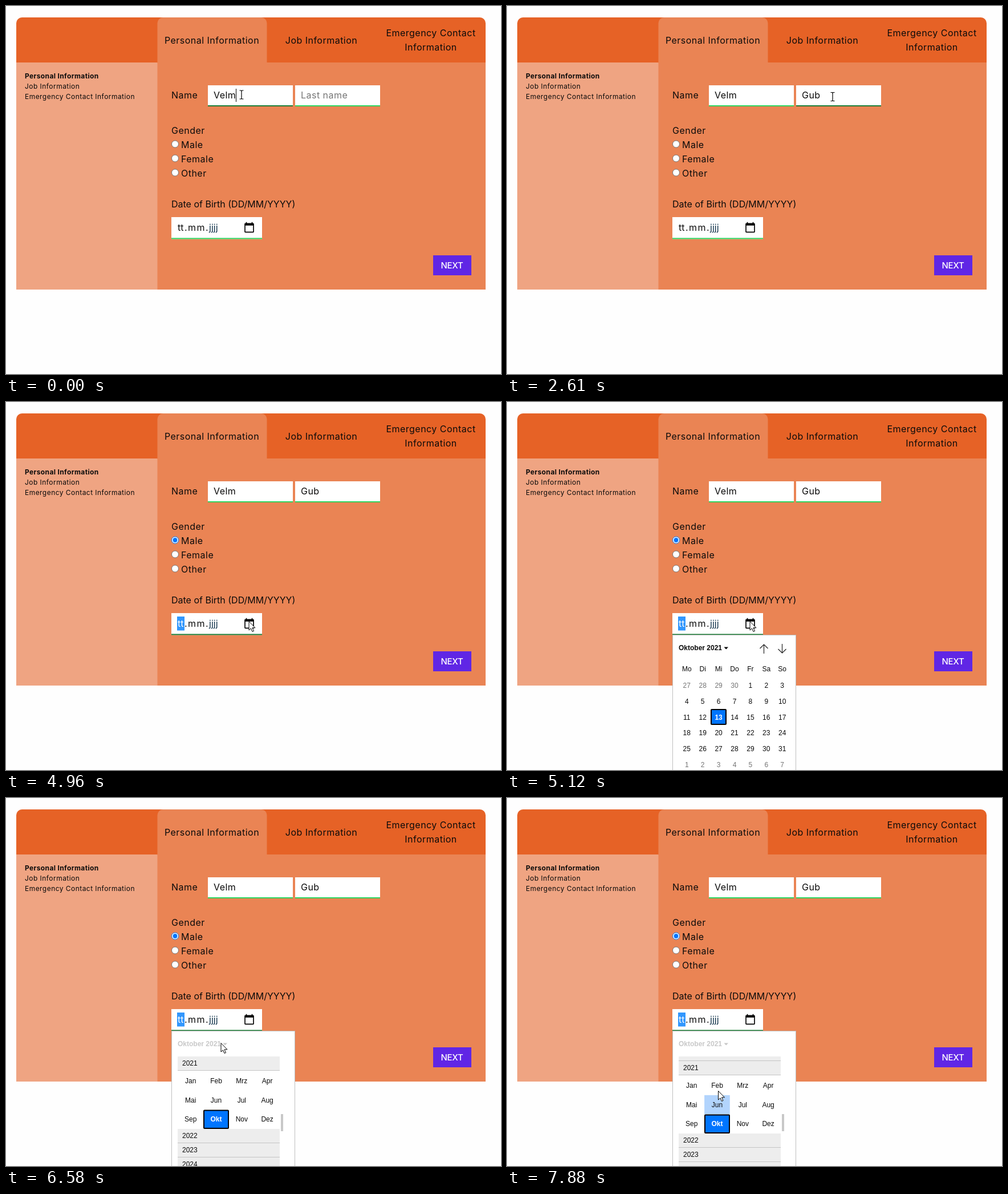
Write an HTML page that moves like this. It is 868 by 645 pixels and loops after 8 s.

```html
<!DOCTYPE html>
<html lang="en">
<head>
<meta charset="utf-8">
<title>Registration form</title>
<style>
html, body { margin: 0; width: 100%; height: 100%; overflow: hidden; background: #fefefe; }
svg { display: block; width: 100vw; height: 100vh; }
text { font: 400 16px Inter, sans-serif; letter-spacing: .03em; fill: #0b0b0b; white-space: pre; }
.mid { text-anchor: middle; }
.side { font-size: 12px; letter-spacing: .038em; }
.here { font-weight: 700; letter-spacing: .03em; }
.wide { letter-spacing: 0; }
.loose { letter-spacing: .09em; }
.next { font-size: 15px; font-weight: 500; letter-spacing: -.015em; fill: #fff; }
.cal text { font: 12px "Liberation Sans", Arial, sans-serif; letter-spacing: 0; }
.cal .bold { font-weight: 700; }
.cal .dim { fill: #757575; }
.cal .on { font-weight: 700; fill: #fff; }
</style>
</head>
<body>
<script>
const NS = 'http://www.w3.org/2000/svg';
const LOOP = 8000;
const FIRST = 'Velm', LAST = 'Gub';
const GREEN = '#2fd45f', FOCUS = '#1c7c36', BLUE = '#0075ff';

function add(parent, tag, attrs = {}, content = '') {
  const el = document.createElementNS(NS, tag);
  set(el, attrs);
  el.textContent = content;
  return parent.appendChild(el);
}
function set(el, attrs) {
  for (const k in attrs) el.setAttribute(k, attrs[k]);
}
const rect = (p, x, y, width, height, fill, more) =>
  add(p, 'rect', { x, y, width, height, fill, ...more });
const text = (p, x, y, str, cls = '') => add(p, 'text', { x, y, class: cls }, str);
const path = (p, d, more) => add(p, 'path', { d, fill: 'none', stroke: '#000', ...more });
const show = (el, on) => set(el, { visibility: on ? 'inherit' : 'hidden' });

const svg = add(document.body, 'svg', { viewBox: '0 0 868 645' });
rect(svg, 0, 0, 868, 645, '#fefefe');

// Card, tabs and side menu
path(svg, 'M18 99V30a10 10 0 0 1 10-10H831a10 10 0 0 1 10 10V99Z', { fill: '#e66226', stroke: 'none' });
rect(svg, 18, 99, 248, 398, '#efa482');
rect(svg, 265.5, 99, 575.5, 398, '#ea8454');
path(svg, 'M265.5 100V30a10 10 0 0 1 10-10H447.500a10 10 0 0 1 10 10V100Z', { fill: '#ea8454', stroke: 'none' });
text(svg, 361, 66, 'Personal Information', 'mid');
text(svg, 553, 66, 'Job Information', 'mid');
text(svg, 745, 53, 'Emergency Contact', 'mid');
text(svg, 745, 78, 'Information', 'mid');
['Personal Information', 'Job Information', 'Emergency Contact Information'].forEach((s, i) =>
  text(svg, 33, 127 + 18 * i, s, i ? 'side' : 'side here'));

// Form
function field(x, y, w, h) {
  rect(svg, x, y, w, h, '#fff');
  return rect(svg, x, y + h - 2, w, 2, GREEN);
}
text(svg, 290, 162, 'Name');
const firstLine = field(354, 139, 149, 37);
const lastLine = field(507, 139, 149, 37);
const firstText = text(svg, 364, 162, FIRST);
const lastText = text(svg, 517, 162, '');
const squiggle = path(svg, 'M517 164' + 'l2 -1.800l2 1.800'.repeat(8), { stroke: '#e02020' });
const caret = rect(svg, 0, 145, 1, 23, '#000');

text(svg, 290, 223.5, 'Gender');
const radios = ['Male', 'Female', 'Other'].map((s, i) => {
  const cy = 242 + 25 * i;
  text(svg, 307, cy + 6.5, s);
  return add(svg, 'circle', { cx: 296.5, cy, r: 6, fill: '#fff', stroke: '#767676' });
});
const dot = add(svg, 'circle', { cx: 296.5, cy: 242, r: 3.9, fill: BLUE });

text(svg, 290, 353, 'Date of Birth (DD/MM/YYYY)', 'wide');
const dateLine = field(290, 370, 159, 38.5);
const mark = rect(svg, 300, 376, 13, 24.5, '#3297fd');
const day = text(svg, 301, 394, 'tt', 'wide');
text(svg, 313, 394, '.mm.', 'loose');
set(text(svg, 356, 394, 'jjjj', 'wide'), { style: 'fill:#0e3048' });
path(svg, 'M20 3h-1V1h-2v2H7V1H5v2H4c-1.1 0-2 .9-2 2v16c0 1.1 .9 2 2 2h16c1.1 0 2-.9 2-2V5c0-1.1-.9-2-2-2zm0 18H4V8h16z',
  { fill: '#000', stroke: 'none', transform: 'translate(416.5 378) scale(.833)' });

rect(svg, 749, 437, 67, 35, '#6026e5');
text(svg, 782, 460, 'NEXT', 'next mid');

// Date picker
const cal = add(svg, 'g', { class: 'cal' });
rect(cal, 290.5, 408.5, 216, 250, '#fff', { stroke: '#bfbfbf' });
const head = add(cal, 'g');
text(head, 301, 435, 'Oktober 2021', 'bold');
path(head, 'M380.500 429.500H388L384.200 433.500Z', { fill: '#000', stroke: 'none' });

const picked = (p, x, y, w, h) =>
  rect(p, x, y, w, h, BLUE, { stroke: '#000', 'stroke-width': 2, rx: 1 });

const days = add(cal, 'g');
path(days, 'M450.500 441V425M443.500 432L450.500 425L457.500 432M482.500 424V440M475.500 433L482.500 440L489.500 433',
  { stroke: '#222', 'stroke-width': 1.2 });
picked(days, 358, 539, 26, 26);
['Mo', 'Di', 'Mi', 'Do', 'Fr', 'Sa', 'So'].forEach((s, col) => {
  const x = 315.3 + 27.9 * col;
  text(days, x, 472, s, 'mid');
  for (let row = 0; row < 6; row++) {
    const n = row * 7 + col - 3;
    const out = n < 1 || n > 31;
    const num = n < 1 ? n + 30 : n > 31 ? n - 31 : n;
    text(days, x, 501 + 27.8 * row, num, 'mid ' + (out ? 'dim' : n === 13 ? 'on' : ''));
  }
});

const months = add(cal, 'g');
const clip = add(add(svg, 'defs'), 'clipPath', { id: 'list' });
rect(clip, 301, 453, 179, 192, '#000');
const list = add(add(months, 'g', { 'clip-path': 'url(#list)' }), 'g');
[[2020, 428], [2021, 453], [2022, 580], [2023, 605], [2024, 630]].forEach(([year, y]) => {
  rect(list, 301, y, 179, 25, '#ededed');
  rect(list, 301, y + 24, 179, 1, '#c4c4c4');
  text(list, 309, y + 16, year);
});
const hover = rect(list, 0, 0, 44.7, 33.6, '#b2d4fd');
picked(list, 347, 547.5, 43, 31.5);
'Jan Feb Mrz Apr Mai Jun Jul Aug Sep Okt Nov Dez'.split(' ').forEach((s, i) =>
  text(list, 323.7 + 44.8 * (i % 4), 500 + 33.6 * (i >> 2), s, s === 'Okt' ? 'mid on' : 'mid'));
rect(months, 482, 554, 4, 30, '#c8c8c8');

// Mouse pointers, both drawn around their hot spot
const beam = path(svg, 'M-3.500 -7.500H-1L0 -6.500L1 -7.500H3.500M0 -6.500V6.500M-3.500 7.500H-1L0 6.500L1 7.500H3.500',
  { 'stroke-width': 1.2 });
const arrow = path(svg, 'M0 .5V16L3.500 12.800L6 18.500L8.500 17.400L6 11.800H11Z', { fill: '#fff' });

// Each move: start, end, number of jumps, target x and y, sag
const moves = [
  [280, 860, 5, 571, 159, 8],
  [2760, 3620, 7, 300, 247, 0],
  [3770, 3770, 1, 296, 244, 0],
  [4230, 4810, 5, 426, 384, 0],
  [5550, 6000, 4, 407, 431, 0],
  [6130, 6430, 3, 377, 429, 0],
  [6860, 7010, 2, 415, 505, 0],
  [7300, 7730, 4, 370.5, 513, 0]
];
function mouse(t) {
  let x = 413, y = 155.5;
  for (const [from, to, n, tx, ty, sag] of moves) {
    if (t < from) break;
    const gap = n > 1 ? (to - from) / (n - 1) : 1;
    const k = Math.min(n, Math.floor((t - from) / gap + .001) + 1) / n;
    x += (tx - x) * k;
    y += (ty - y) * k + sag * Math.sin(Math.PI * k);
  }
  return { x, y };
}
const within = (t, a, b) => t >= a && t < b;

function draw(t) {
  const { x, y } = mouse(t);
  const inLast = within(t, 860, 4080);
  const typed = t < 1740 ? 0 : Math.min(3, Math.floor((t - 1740) / 150) + 1);

  set(firstLine, { fill: t < 860 ? FOCUS : GREEN });
  set(lastLine, { fill: inLast ? FOCUS : GREEN });
  lastText.textContent = typed ? LAST.slice(0, typed) : 'Last name';
  lastText.style.fill = typed ? '#0b0b0b' : '#757575';
  show(squiggle, within(t, 3050, 4080));

  const end = inLast
    ? 517 + (typed ? lastText.getComputedTextLength() : 0)
    : 364 + firstText.getComputedTextLength();
  set(caret, { x: Math.round(end) });
  show(caret, t < 570 || within(t, 860, 1460) || within(t, 1740, 2610) || within(t, 3050, 3620));

  const checked = t >= 4080;
  const near = Math.hypot(x - 296.5, y - 242) < 7;
  set(radios[0], { stroke: checked ? BLUE : near ? '#4f4f4f' : '#767676' });
  show(dot, checked);

  const inDate = t >= 4960;
  set(dateLine, { fill: inDate ? FOCUS : GREEN });
  show(mark, inDate);
  day.style.fill = inDate ? '#fff' : '#0b0b0b';

  const byMonth = t >= 6580;
  show(cal, t >= 5120);
  show(days, !byMonth);
  show(months, byMonth);
  set(head, { opacity: byMonth ? .22 : 1 });

  const col = Math.floor((x - 301.3) / 44.8), row = Math.floor((y - 479.2) / 33.6);
  set(hover, { x: 301.3 + 44.8 * col, y: 479.2 + 33.6 * row });
  show(hover, byMonth && row >= 0);
  set(list, { transform: `translate(0 ${t >= 7880 ? 8 : 0})` });

  const overText = y < 176 && x > 354;
  for (const el of [beam, arrow]) set(el, { transform: `translate(${x} ${y})` });
  show(beam, overText);
  show(arrow, !overText);
}

const start = performance.now();
function tick() {
  draw((performance.now() - start) % LOOP);
  requestAnimationFrame(tick);
}
tick();
</script>
</body>
</html>
```
